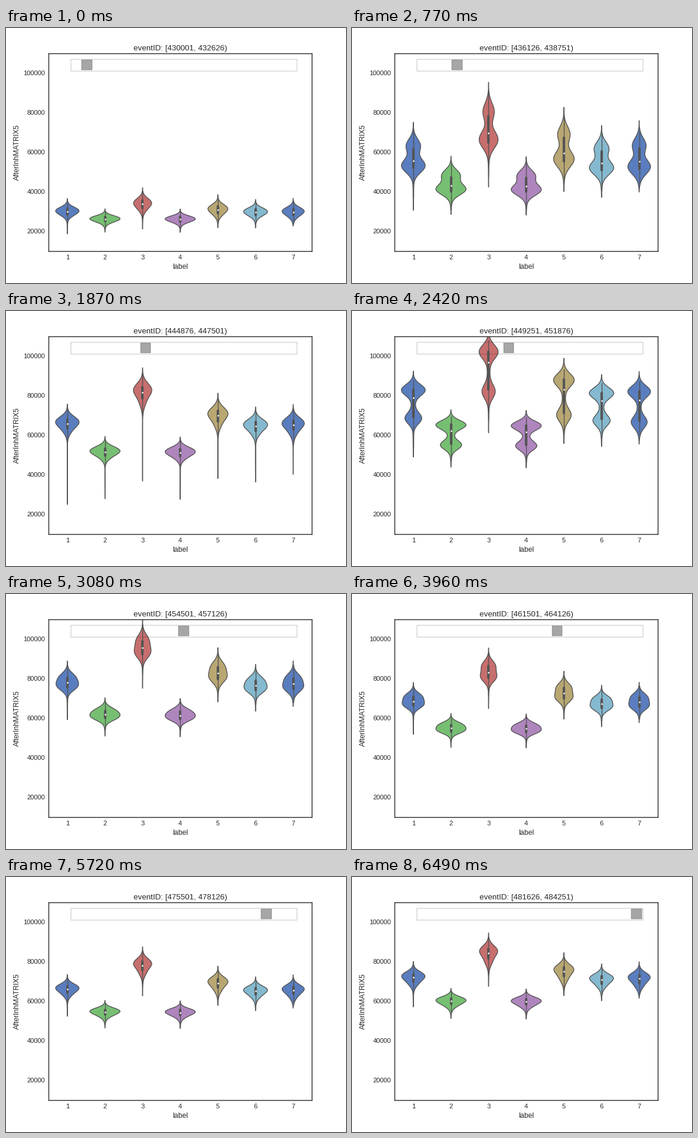
A matplotlib script for the animation above (6600 ms loop, 576 by 432 pixels).

```python
import colorsys

import matplotlib.pyplot as plt
import numpy as np
from matplotlib.animation import FuncAnimation
from matplotlib.colors import to_rgb
from matplotlib.patches import Polygon, Rectangle

FRAMES, INTERVAL = 60, 110
FIRST_EVENT, STEP, WINDOW = 430001, 875, 2625
W, H = 576, 432
INK, GRAY = "0.15", "0.328"
LW = 1.25

# What sets the seven violins apart: position, width and length of tail
PALETTE = ["#4878CF", "#6ACC65", "#D65F5F", "#B47CC7", "#C4AD66", "#77BEDB", "#4878CF"]
GAIN = np.array([1, 0.775, 1.25, 0.77, 1.065, 0.98, 0.99])
SPREAD = np.array([1, 0.8, 1.25, 0.8, 1.15, 0.98, 1.05])
DROP = np.array([1.5, 0.85, 1.6, 0.85, 1.1, 1, 0.85])
TAIL = 0.02

# Course shared by all violins, in thousands:
# time, main mode, its spread, offset and weight of the second mode, tail depth
COURSE = np.array([
    (0, 30.8, 1.70, -2.3, 0.30, 6.5),
    (7, 53.2, 3.50, 10.1, 0.37, 15),
    (17, 67.0, 2.60, -4.5, 0.22, 25),
    (22, 83.0, 2.80, -14.5, 0.35, 13),
    (24, 81.0, 2.60, 4.6, 0.42, 12),
    (36, 66.9, 2.10, 4.1, 0.45, 10),
    (45, 61.0, 1.75, -2.8, 0.24, 7),
    (59, 73.0, 2.10, -3.8, 0.27, 8),
])

plt.rcParams.update({
    "font.family": "Liberation Sans",
    "text.color": INK,
    "axes.edgecolor": INK,
    "axes.linewidth": 1.25,
    "xtick.color": INK,
    "ytick.color": INK,
})


def muted(color):
    h, l, s = colorsys.rgb_to_hls(*to_rgb(color))
    return colorsys.hls_to_rgb(h, l, s * 0.75)


def bell(y, mean, spread):
    return np.exp(-0.5 * ((y - mean) / spread) ** 2) / (spread * np.sqrt(2 * np.pi))


def profiles(i):
    """Height and density arrays of every violin at step i."""
    level, width, shift, w2, depth = (np.interp(i, COURSE[:, 0], c) for c in COURSE.T[1:])
    contrast = 1.07 - 0.52 * np.exp(-i / 2.5) - 0.006 * i
    bridge = 0.12 * np.clip(abs(shift) / width - 4, 0, 1)
    curves = []
    for gain, spread, drop in zip(GAIN ** contrast, SPREAD, DROP):
        m1 = level * gain
        m2 = m1 + shift * spread ** 1.5
        s = width * spread
        bottom, fall = min(m1, m2), depth * drop
        y = np.linspace(bottom - fall, max(m1, m2) + 3.4 * s, 160)
        d = (1 - w2 - bridge - TAIL) * bell(y, m1, s) + w2 * bell(y, m2, s)
        d += TAIL * bell(y, bottom - fall / 2, fall / 4)
        d += bridge * bell(y, (m1 + m2) / 2, 0.3 * abs(m1 - m2) + 0.5)
        curves.append((y, d))
    return curves


def box_stats(y, d):
    q1, med, q3 = np.interp([0.25, 0.5, 0.75], np.cumsum(d) / d.sum(), y)
    mean = np.average(y, weights=d)
    margin = 0.6 * np.sqrt(np.average((y - mean) ** 2, weights=d))
    reach = 1.5 * (q3 - q1)
    low = max(y[0] + margin, q1 - reach)
    high = min(y[-1] - margin, q3 + reach)
    return low, q1, med, q3, high


fig = plt.figure(figsize=(W / 80, H / 80), dpi=80, facecolor="white")
ax = fig.add_axes([0.125, 0.125, 0.775, 0.775])
ax.set_xlim(-0.5, 6.5)
ax.set_ylim(10, 110)
ax.set_xticks(range(7), [str(n + 1) for n in range(7)])
ax.set_yticks(range(20, 101, 20), [f"{v}000" for v in range(20, 101, 20)], va="center")
ax.tick_params(length=0, pad=5, labelsize=10)
fig.text(295.2 / W, 1 - 408.3 / H, "label", size=11, ha="center", va="baseline")
fig.text(22.2 / W, 1 - 210.6 / H, "AfterInhMATRIX5", size=11, rotation=90,
         rotation_mode="anchor", ha="center", va="baseline")
title = ax.set_title("", size=12, pad=5)

violins, whiskers, boxes, dots = [], [], [], []
for n, color in enumerate(PALETTE):
    body = Polygon([(n, 0), (n, 1), (n, 2)], facecolor=muted(color), edgecolor=GRAY,
                   linewidth=LW, joinstyle="round")
    violins.append(ax.add_patch(body))
    whiskers += ax.plot([], [], color=GRAY, lw=LW)
    boxes += ax.plot([], [], color=GRAY, lw=3 * LW, solid_capstyle="round")
    dots += ax.plot([], [], "o", color="white", ms=2 * LW, mew=0, zorder=3)

bar_style = dict(edgecolor="black", linewidth=0.3, alpha=0.7)
ax.add_patch(Rectangle((0.1, 101), 6, 6, facecolor="none", **bar_style))
slider = ax.add_patch(Rectangle((0.383, 101.7), 0.275, 5, facecolor="gray", **bar_style))


def update(i):
    first = FIRST_EVENT + STEP * i
    title.set_text(f"eventID: [{first}, {first + WINDOW})")
    slider.set_x(0.383 + 0.0917 * i)

    curves = profiles(i)
    widest = max(d.max() for _, d in curves)
    for n, (y, d) in enumerate(curves):
        half = 0.4 * d / widest
        x = np.concatenate([n - half, (n + half)[::-1]])
        violins[n].set_xy(np.column_stack([x, np.concatenate([y, y[::-1]])]))
        low, q1, med, q3, high = box_stats(y, d)
        whiskers[n].set_data([n, n], [low, high])
        boxes[n].set_data([n, n], [q1, q3])
        dots[n].set_data([n], [med])
    return [title, slider, *violins, *whiskers, *boxes, *dots]


anim = FuncAnimation(fig, update, frames=FRAMES, interval=INTERVAL, repeat=True,
                     repeat_delay=0, blit=False)
plt.show()
```
